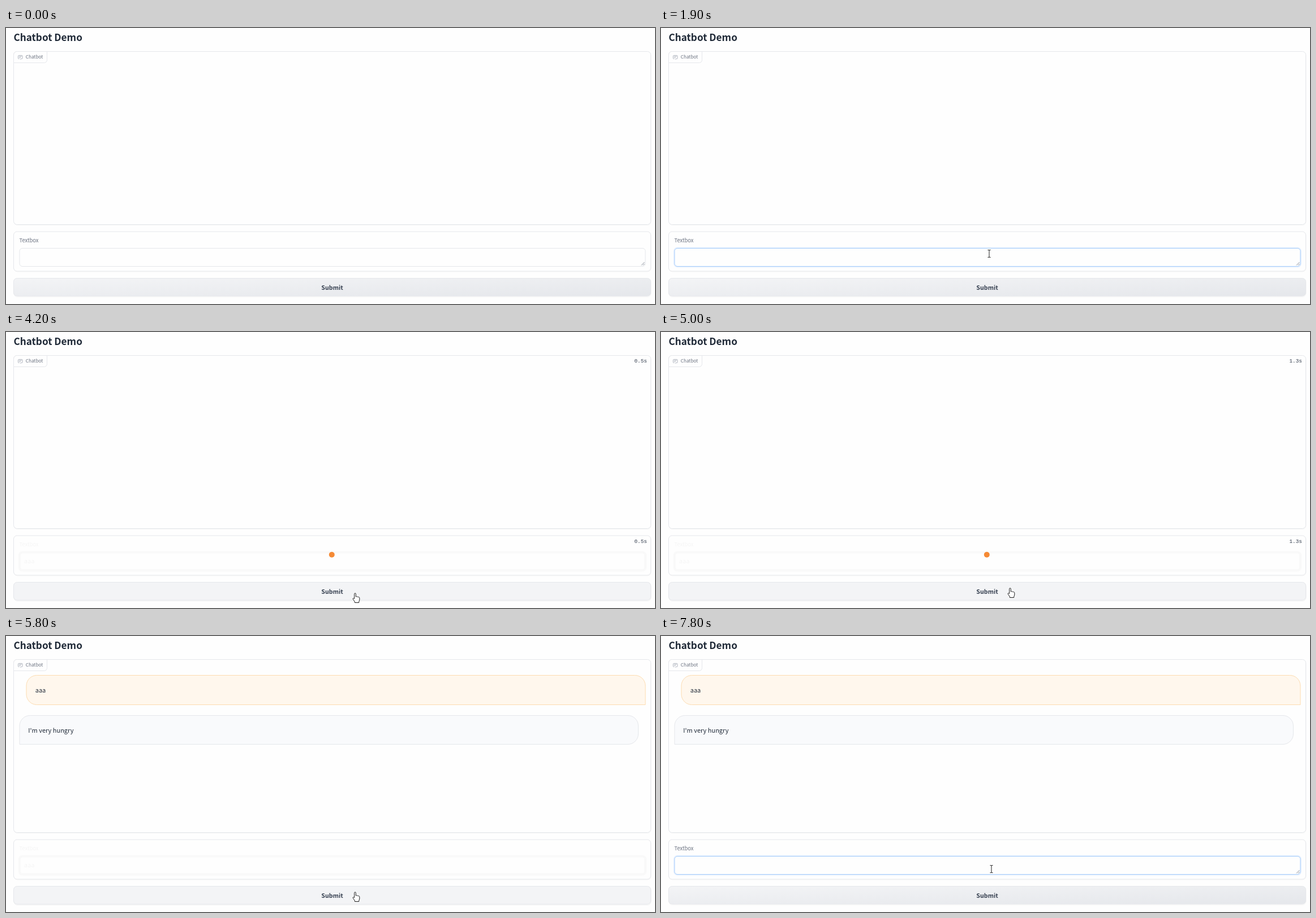
Animation, 1147 px wide and 488 px high, one loop 8 s. Source, as an HTML page:

```html
<!DOCTYPE html>
<html lang="en">
<head>
<meta charset="utf-8">
<title>Chatbot Demo</title>
<style>
  html, body { margin: 0; width: 100%; height: 100%; overflow: hidden; background: #fefefe; }
  svg { display: block; width: 1147px; height: 488px; }
  text { font: 11px "Noto Sans CJK JP", "Noto Sans CJK SC", "Noto Sans CJK", "Open Sans", sans-serif; fill: #1f2937; }
  .title { font-size: 17.2px; font-weight: 700; }
  .submit { font-size: 10.7px; font-weight: 700; fill: #374151; text-anchor: middle; }
  .label { font-size: 9.3px; fill: #6b7280; }
  .tab { font-size: 8.2px; fill: #6b7280; }
  .timer { font: 9.4px "Liberation Mono", monospace; fill: #374151; text-anchor: end; }
  .panel, .field { fill: #fefefe; stroke: #e5e7eb; }
  .line { fill: none; stroke: #9ca3af; stroke-width: .8; }
  .shadow { fill: none; stroke: #000; stroke-opacity: .035; }
  .ring { fill: none; stroke: #bfdbfe; stroke-opacity: .35; stroke-width: 4; }
  .focus .field { stroke: #a3cbfa; }
  svg:not(.focus) .ring { display: none; }
  .pending .label, .pending .value { fill: #f5f5f5; }
  .pending .field { stroke: #f9f9f9; stroke-width: 4; }
  .pending .grip { display: none; }
  svg:not(.pending) .loader { display: none; }
  svg:not(.answered) .reply { display: none; }
  .button { fill: url(#idle); stroke: #e5e7eb; }
  .hover .button { fill: #f3f4f6; }
  .hover .lift { stroke-opacity: .06; }
  .pointer { fill: #fff; stroke: #222; stroke-width: 1; stroke-linejoin: round; display: none; }
</style>
</head>
<body>
<svg id="stage" viewBox="0 0 1147 488">
  <defs>
    <linearGradient id="idle" x1="0" y1="0" x2="1" y2="1">
      <stop stop-color="#f3f4f6"/>
      <stop offset="1" stop-color="#e5e7eb"/>
    </linearGradient>
  </defs>

  <text class="title" x="13.5" y="23">Chatbot Demo</text>

  <rect class="shadow" x="14" y="42.5" width="1126" height="306" rx="6"/>
  <rect class="panel" x="13.5" y="41.5" width="1126" height="306" rx="6"/>
  <path class="panel" d="M13.5 61.5V47.5a6 6 0 0 1 6-6H72.5V56.5a5 5 0 0 1-5 5Z"/>
  <path class="line" d="M23.5 54.5h-1a1 1 0 0 1-1-1v-4a1 1 0 0 1 1-1h5.5a1 1 0 0 1 1 1v4a1 1 0 0 1-1 1h-1.5l-1.5 1.2M23 50.4h4.5M23 52.3h3"/>
  <text class="tab" x="34.7" y="54.4">Chatbot</text>

  <g class="reply">
    <path d="M54.5 69.5H1111.5a18.5 18.5 0 0 1 18.5 18.5V121.5H54.5a18.5 18.5 0 0 1-18.5-18.5V88a18.5 18.5 0 0 1 18.5-18.5Z" fill="#fff7ed" stroke="#fddcb0"/>
    <text x="51.7" y="100.4">aaa</text>
    <path d="M42.5 140.5H1099a18.5 18.5 0 0 1 18.5 18.5V173a18.5 18.5 0 0 1-18.5 18.5H24V159a18.5 18.5 0 0 1 18.5-18.5Z" fill="#f9fafc" stroke="#e5e7eb"/>
    <text x="39.3" y="170.7">I'm very hungry</text>
  </g>

  <rect class="shadow" x="14" y="361" width="1126" height="70" rx="6"/>
  <rect class="panel" x="13.5" y="360" width="1126" height="70" rx="6"/>
  <text class="label" x="23.6" y="379">Textbox</text>
  <rect class="ring" x="24" y="389.5" width="1106" height="32" rx="5"/>
  <rect class="field" x="24" y="389.5" width="1106" height="32" rx="5"/>
  <path class="grip line" d="M1123 419.5l5.5-5.5M1126 419.5l2.5-2.5" style="stroke:#6b7280"/>
  <text class="value" id="value" x="31.8" y="409"></text>
  <rect id="caret" y="398" width="1" height="14" fill="#1f2937"/>

  <g class="loader">
    <circle cx="575.8" cy="393.7" r="5" fill="#f58a35"/>
    <text class="timer" x="1133" y="54.3"></text>
    <text class="timer" x="1133" y="373"></text>
  </g>

  <rect class="shadow lift" x="14" y="443.5" width="1126" height="32" rx="6"/>
  <rect class="button" x="13.5" y="442.5" width="1126" height="31.5" rx="6"/>
  <text class="submit" x="576.5" y="463">Submit</text>

  <path class="pointer" id="arrow" d="M-3-7V5L-.3 2.6 1.6 6.6 3.4 5.8 1.6 1.9H5Z"/>
  <path class="pointer" id="beam" style="fill:none" d="M-2.5-6.5h1.5q1 0 1 1V5.5q0 1-1 1h-1.5M2.5-6.5H1q-1 0-1 1M0 5.5q0 1 1 1h1.5"/>
  <path class="pointer" id="hand" d="M-2.3 1.5V-6.8a1.3 1.3 0 0 1 2.6 0V-1.8c.5-.9 2-.8 2.3.2 .6-.7 1.9-.5 2.2.5 .8-.5 2 0 2 1.2V4l-1.1 3V8.5H-1.6V7L-4.8 2.2c-.6-1 .6-2 1.6-1.2Z"/>
</svg>
<script>
  const LOOP = 8000;
  const $ = id => document.getElementById(id);
  const stage = $("stage"), value = $("value"), caret = $("caret");
  const timers = document.querySelectorAll(".timer");
  const pointers = ["arrow", "beam", "hand"].map($);

  // time, x, y, pointer shape
  const moves = [
    [600, 914, 216, "arrow"], [700, 762, 303, "arrow"], [800, 686, 342, "arrow"],
    [900, 636, 366, "arrow"], [1000, 597, 397, "arrow"], [1100, 586, 400, "beam"],
    [1200, 582, 399, "beam"], [1300, 580, 399, "beam"],
    [3100, 582, 405, "beam"], [3200, 581, 432, "arrow"], [3300, 608, 478, "hand"],
    [3400, 615, 474, "hand"], [3500, 618, 471, "hand"], [3600, 618, 470, "hand"],
    [4800, 618, 461, "hand"],
    [6600, 606, 437, "arrow"], [6700, 590, 418, "beam"], [6800, 584, 412, "beam"]
  ];
  const keys = [2600, 2800, 3000];
  const caretOn = [[1400, 1900], [2400, 3500], [7300, 7800]];

  function draw(t) {
    const within = (a, b) => t >= a && t < b;
    const toggle = (name, on) => stage.classList.toggle(name, on);
    const pending = within(3800, 5900);

    toggle("focus", within(1400, 3800) || t >= 7300);
    toggle("pending", pending);
    toggle("answered", t >= 5800);
    toggle("hover", within(3300, 6600));

    const typed = t < 5900 ? keys.filter(k => t >= k).length : 0;
    value.textContent = "a".repeat(typed);
    caret.setAttribute("x", 32 + Math.round(typed * 6.2));
    caret.style.display = caretOn.some(([a, b]) => within(a, b)) ? "" : "none";

    // the spinner and timers go as soon as the reply is there
    document.querySelector(".loader").style.visibility = t < 5800 ? "" : "hidden";
    const seconds = Math.max(0, Math.floor((t - 3700) / 100)) / 10;
    timers.forEach(el => el.textContent = seconds.toFixed(1) + "s");

    const move = moves.filter(m => t >= m[0]).pop();
    for (const p of pointers) {
      const on = move && p.id === move[3];
      p.style.display = on ? "inline" : "none";
      if (on) p.setAttribute("transform", `translate(${move[1]} ${move[2]})`);
    }
  }

  const start = performance.now();
  function tick() {
    draw((performance.now() - start) % LOOP);
    requestAnimationFrame(tick);
  }
  tick();
</script>
</body>
</html>
```
